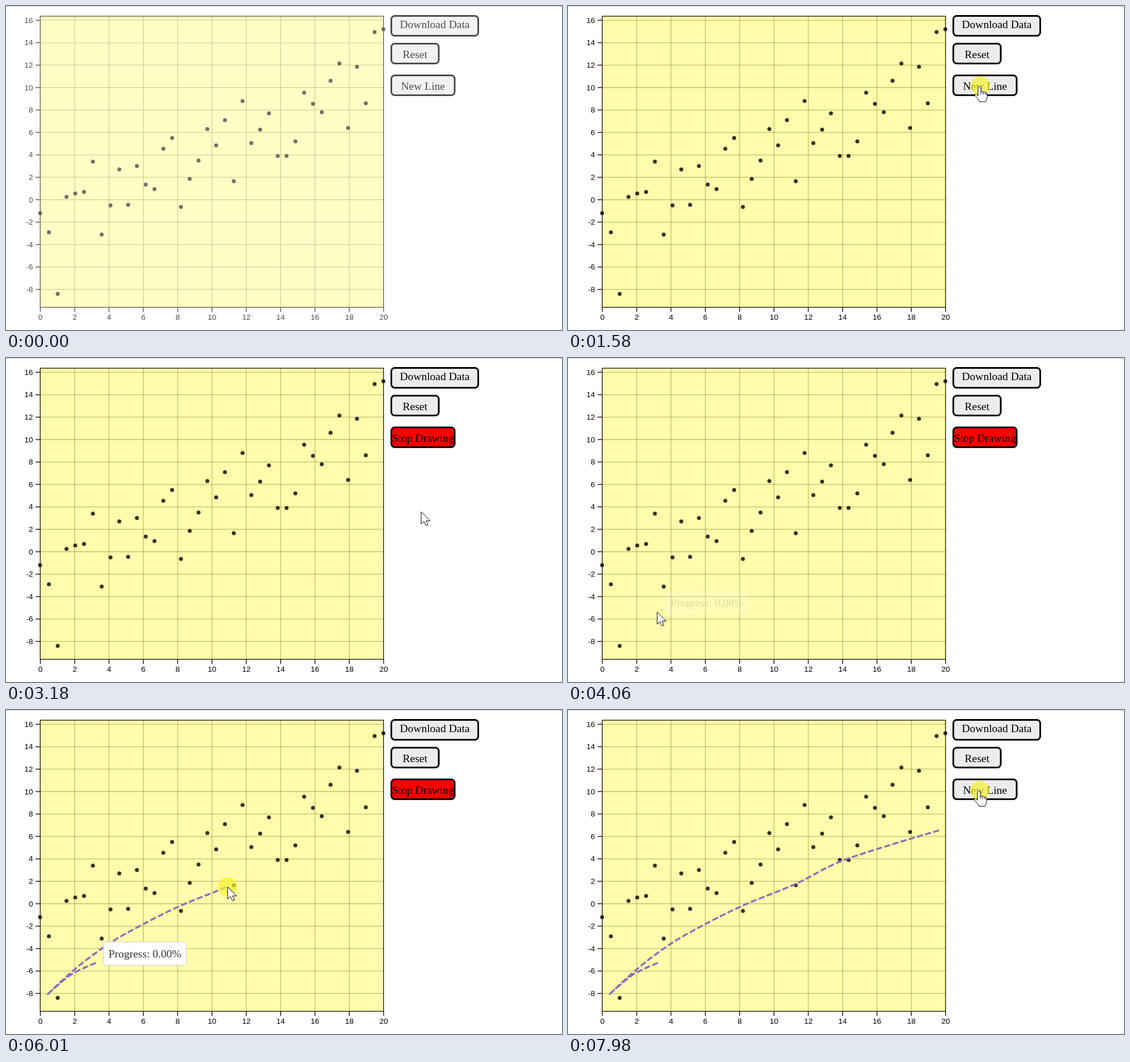
Animation of 979 by 572 pixels, one loop 8 s. Source, as an HTML page with a canvas:

```html
<!DOCTYPE html>
<html lang="en">
<head>
<meta charset="utf-8">
<title>Draw a trend line</title>
<style>
  html, body { margin: 0; width: 100%; height: 100%; overflow: hidden; background: #fff; }
  canvas { display: block; }
</style>
</head>
<body>
<canvas id="stage" width="979" height="572"></canvas>
<script>
const ctx = document.getElementById('stage').getContext('2d');
const LOOP = 8000;
const SERIF = '19.5px "Liberation Serif", "Times New Roman", serif';
const SANS = '13.5px "Liberation Sans", Arial, sans-serif';
const PALETTE = ['#1f77b4', '#ff7f0e', '#2ca02c', '#d62728', '#9467bd', '#8c564b'];
const BUTTON = '#ececec';

// Moments of the story, in ms
const OPEN = 1640, PICK = 3180, PRESS = 4300, RELEASE = 6690, JUMP = 6750, STOP = 7640;
const clicks = [[1500, OPEN], [3100, PICK], [PRESS, RELEASE], [7500, STOP], [7980, LOOP]];

// The plotted data, evenly spaced over x = 0..20
const samples = [
  -1.2, -2.9, -8.4, .25, .55, .7, 3.4, -3.1, -.5, 2.7, -.45, 3, 1.35, .95, 4.55, 5.5, -.65, 1.85, 3.5, 6.3,
  4.85, 7.1, 1.65, 8.8, 5.05, 6.25, 7.7, 3.9, 3.9, 5.2, 9.55, 8.55, 7.8, 10.6, 12.15, 6.4, 11.85, 8.6, 14.95, 15.2
];

// Cursor path as [time, x, y]; the drawn line follows it between PRESS and RELEASE
const cursorKeys = [
  [500, 846, 520], [820, 738, 221], [1430, 726, 141], [2220, 726, 141], [2290, 721, 161], [2880, 731, 271],
  [3320, 731, 271], [4060, 157, 448], [PRESS, 157, 447], [4600, 118, 465], [4900, 72, 503], [5200, 122, 457],
  [5400, 182, 412], [5560, 238, 380], [5810, 304, 347], [6040, 403, 306], [6210, 476, 269], [6380, 565, 239],
  [6610, 655, 212], [RELEASE, 655, 212], [JUMP, 650, 212], [7000, 650, 212], [7480, 725, 142]
];

const ramp = (t, from, to) => Math.max(0, Math.min(1, (t - from) / (to - from)));
const between = (t, from, to) => t >= from && t < to;
const xPos = v => 60.5 + v * 30.22;
const yPos = v => 342 - v * 19.8;

// Monotone cubic through the keys: smooth on the way, at rest on holds and turns
function slope(i, axis) {
  if (i < 1 || i > cursorKeys.length - 2) return 0;
  const [a, b, c] = cursorKeys.slice(i - 1, i + 2);
  const before = (b[axis] - a[axis]) / (b[0] - a[0]);
  const after = (c[axis] - b[axis]) / (c[0] - b[0]);
  return before * after <= 0 ? 0 : 2 * before * after / (before + after);
}

function cursorAt(t) {
  const next = cursorKeys.findIndex(k => k[0] > t);
  if (next < 1) return cursorKeys.at(next).slice(1);
  const a = cursorKeys[next - 1], b = cursorKeys[next];
  const span = b[0] - a[0], p = (t - a[0]) / span, q = 1 - p;
  return [1, 2].map(axis =>
    a[axis] * q * q * (1 + 2 * p) + b[axis] * p * p * (3 - 2 * p) +
    span * p * q * (slope(next - 1, axis) * q - slope(next, axis) * p));
}

function line(x1, y1, x2, y2, color, width) {
  ctx.strokeStyle = color;
  ctx.lineWidth = width;
  ctx.beginPath();
  ctx.moveTo(x1, y1);
  ctx.lineTo(x2, y2);
  ctx.stroke();
}

function disc(x, y, r, color) {
  ctx.fillStyle = color;
  ctx.beginPath();
  ctx.arc(x, y, r, 0, 7);
  ctx.fill();
}

function box(x, y, w, h, r, fill, border, width) {
  ctx.beginPath();
  ctx.roundRect(x, y, w, h, r);
  ctx.fillStyle = fill;
  ctx.fill();
  ctx.strokeStyle = border;
  ctx.lineWidth = width;
  ctx.stroke();
}

function text(label, x, y, font = SERIF, align = 'center', color = '#000') {
  ctx.font = font;
  ctx.textAlign = align;
  ctx.fillStyle = color;
  ctx.fillText(label, x, y);
}

function button(label, y, w, baseline, fill = BUTTON) {
  box(678.5, y, w, 35, 6, fill, '#000', 3);
  text(label, 678.5 + w / 2, baseline);
}

function drawChart() {
  ctx.fillStyle = '#fffdac';
  ctx.fillRect(60, 18, 605, 514);
  const grid = 'rgba(85,85,0,.36)';
  for (let v = 0; v <= 20; v += 2) {
    const x = xPos(v);
    if (v > 0 && v < 20) line(x, 18, x, 532, grid, 1.3);
    line(x, 532, x, 540, '#000', 1.3);
    text(v, x, 554, SANS);
  }
  for (let v = -8; v <= 16; v += 2) {
    const y = yPos(v);
    line(60, y, 665, y, grid, 1.3);
    line(52, y, 60, y, '#000', 1.3);
    text(v, 47.5, y + 4.5, SANS, 'right');
  }
  ctx.strokeStyle = '#22220c';
  ctx.lineWidth = 1.4;
  ctx.strokeRect(60.3, 18, 604.4, 514);
  samples.forEach((v, i) => disc(60 + i * 15.5, yPos(v), 3.5, 'rgba(0,0,0,.8)'));
}

function drawStroke(t) {
  if (t < PRESS) return;
  const end = Math.min(t, RELEASE);
  ctx.save();
  ctx.beginPath();
  for (let s = PRESS; s < end; s += 10) ctx.lineTo(...cursorAt(s));
  ctx.lineTo(...cursorAt(end));
  ctx.setLineDash([8, 7]);
  ctx.lineCap = ctx.lineJoin = 'round';
  ctx.strokeStyle = '#916cb8';
  ctx.lineWidth = 3.4;
  ctx.stroke();
  ctx.restore();
}

function drawPanel() {
  box(671.5, 178.5, 139, 118, 7, BUTTON, '#000', 3);
  text('Line Color', 741, 199);
  PALETTE.forEach((color, i) =>
    box(678 + i % 3 * 42.2, 205.5 + Math.floor(i / 3) * 42.3, 42.2, 42.3, 0, color, '#111', 1.6));
}

function drawTooltip(t) {
  const appear = ramp(t, 4010, 4320), leave = ramp(t, 7000, 7250);
  const [x, y] = t < JUMP ? [171.5, 413 - 3.5 * appear] : [663.5 + 8 * leave, 172.5 - 4 * leave];
  ctx.globalAlpha = appear * (1 - leave);
  box(x, y, 146, 41, 5, '#fff', '#ccc', 1);
  text('Progress: 0.00%', x + 73, y + 27, SERIF, 'center', '#333');
  ctx.globalAlpha = 1;
}

const arrow = new Path2D('M0 0V21.5L5 17L8.5 24.5L12 23L8.6 16H15.8Z');
const hand = new Path2D('M-4 2Q-1.5-2 1 2V10Q3 8 5 10.5Q7.5 9 9 11.5Q11.5 11 12 14V20Q11 25 9 27.5H-1' +
  'Q-4 22-9 17Q-10.5 13.5-7 14L-4 17ZM1 10V14.5M5 10.5V15M9 11.5V15.5');

function drawCursor(t) {
  if (t < cursorKeys[0][0]) return;
  const [x, y] = cursorAt(t);
  if (clicks.some(([from, to]) => between(t, from, to))) disc(x, y, 17, 'rgba(246,243,50,.7)');
  const overButton = x > 677 && y < 166;
  const overSwatch = between(t, OPEN, PICK) && y > 205;
  const shape = overButton || overSwatch ? hand : arrow;
  ctx.save();
  ctx.translate(x, y + .5);
  ctx.fillStyle = '#fff';
  ctx.fill(shape);
  ctx.strokeStyle = '#000';
  ctx.lineWidth = 1;
  ctx.stroke(shape);
  ctx.restore();
}

function draw(t) {
  ctx.fillStyle = '#fff';
  ctx.fillRect(0, 0, 979, 572);
  drawChart();
  drawStroke(t);
  button('Download Data', 17.5, 153, 39);
  button('Reset', 66.5, 83.5, 92);
  if (between(t, OPEN, STOP)) button('Stop Drawing', 122.5, 111.5, 148, '#f00');
  else button('New Line', 122.5, 111.5, 148);
  if (between(t, OPEN, PICK)) drawPanel();
  drawTooltip(t);
  drawCursor(t);

  const veil = .3 * (1 - ramp(t, 430, 750));
  ctx.fillStyle = `rgba(255,255,255,${veil})`;
  ctx.fillRect(0, 0, 979, 572);
  line(0, .5, 979, .5, '#c8c8c8', 1);
}

const start = performance.now();
function tick() {
  draw((performance.now() - start) % LOOP);
  requestAnimationFrame(tick);
}
tick();
</script>
</body>
</html>
```
